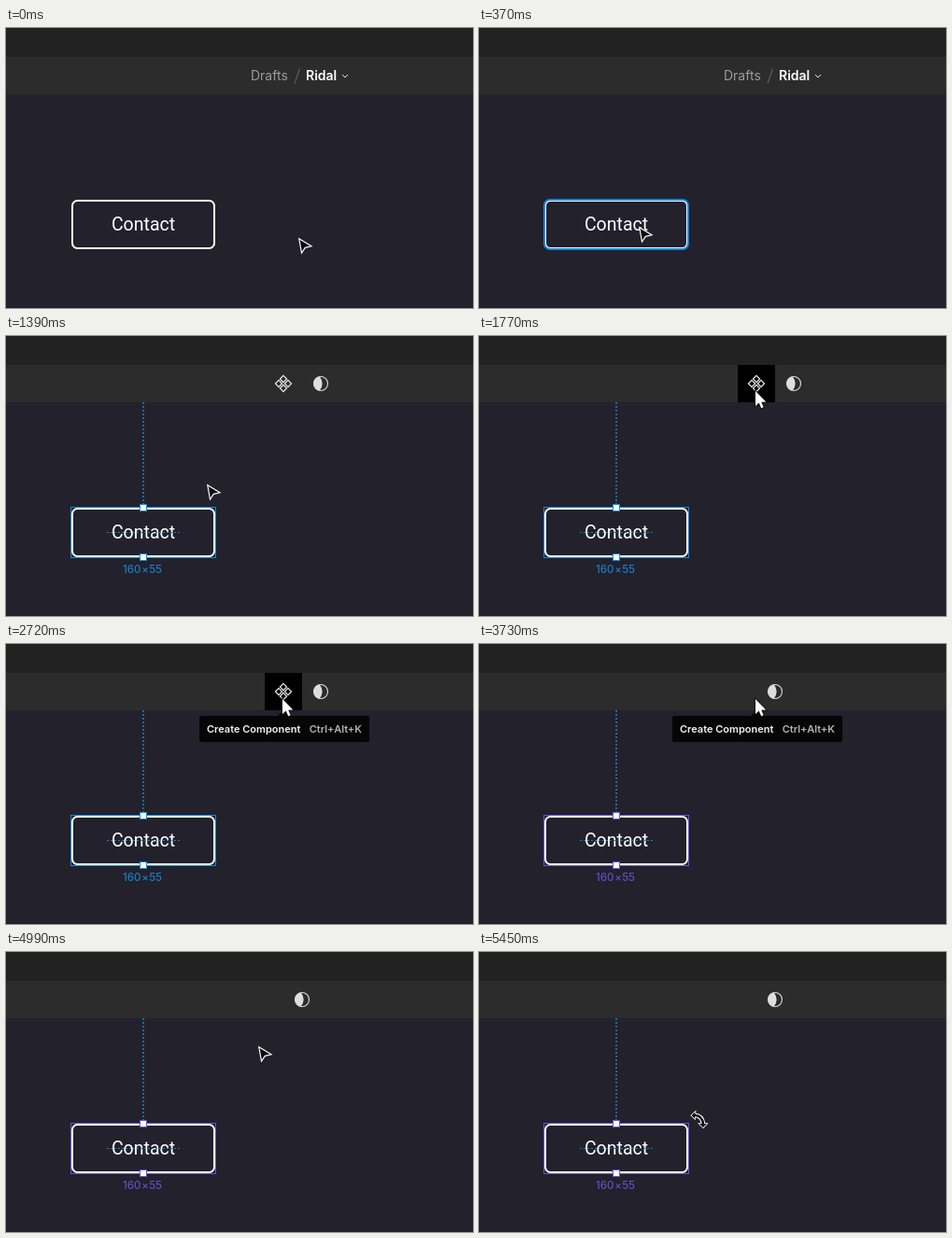
Recreate the animation shown at these times as an HTML page with a canvas. Size 500 by 300 pixels, loop 7090 ms.

```html
<!DOCTYPE html>
<html lang="en">
<head>
<meta charset="utf-8">
<title>Create component</title>
<style>
html, body { margin: 0; width: 100%; height: 100%; overflow: hidden; background: #22212c; }
canvas { display: block; width: 500px; height: 300px; }
</style>
</head>
<body>
<canvas id="stage" width="500" height="300"></canvas>
<script>
const ctx = document.getElementById('stage').getContext('2d');
const LOOP = 7090;
const BLUE = '#1588da', PURPLE = '#6a52d8';

// Pointer moves: start time, interval, step count, from, to
const moves = [
  { at: 70, gap: 75, steps: 5, from: [313, 225], to: [171, 213] },
  { at: 1230, gap: 77, steps: 8, from: [171, 213], to: [296, 59] },
  { at: 4690, gap: 75.5, steps: 10, from: [296, 59], to: [229, 170] }
];

function ease(u) {
  return 0.6 * u + 0.4 * u * u * (3 - 2 * u);
}

function pointerAt(t) {
  let pos = moves[0].from;
  for (const m of moves) {
    if (t < m.at) break;
    const step = Math.min(m.steps, Math.floor((t - m.at) / m.gap) + 1);
    const k = ease(step / m.steps);
    pos = m.from.map((v, i) => Math.round(v + (m.to[i] - v) * k));
  }
  return pos;
}

function box(x, y, w, h, color) {
  ctx.fillStyle = color;
  ctx.fillRect(x, y, w, h);
}

function text(s, x, y, font, color, align = 'left') {
  ctx.font = font;
  ctx.fillStyle = color;
  ctx.textAlign = align;
  ctx.fillText(s, x, y);
}

function line(points, color, width = 1, dash = []) {
  ctx.beginPath();
  points.forEach(([x, y]) => ctx.lineTo(x, y));
  ctx.strokeStyle = color;
  ctx.lineWidth = width;
  ctx.setLineDash(dash);
  ctx.stroke();
  ctx.setLineDash([]);
}

function shape(points, fill, stroke, width = 1, x = 0, y = 0) {
  ctx.beginPath();
  points.forEach(p => ctx.lineTo(x + p[0], y + p[1]));
  ctx.closePath();
  if (fill) {
    ctx.fillStyle = fill;
    ctx.fill();
  }
  if (stroke) {
    ctx.strokeStyle = stroke;
    ctx.lineWidth = width;
    ctx.stroke();
  }
}

function round(x, y, w, h, r) {
  ctx.beginPath();
  ctx.roundRect(x, y, w, h, r);
}

function title() {
  text('Drafts', 262, 56, '14px Inter, sans-serif', '#9c9c9c');
  line([[309, 59.5], [314.5, 43.5]], '#686868');
  text('Ridal', 321, 56, '600 14px Inter, sans-serif', '#fff');
  line([[360, 50], [363, 53], [366, 50]], '#e8e8e8');
}

function componentIcon(x, y) {
  const d = 3.6;
  for (const [dx, dy] of [[0, -5], [5, 0], [0, 5], [-5, 0]]) {
    shape([[0, -d], [d, 0], [0, d], [-d, 0]], null, '#f2f2f2', 1.1, x + dx, y + dy);
  }
}

function maskIcon(x, y) {
  ctx.beginPath();
  ctx.arc(x, y, 7.5, 0, Math.PI * 2);
  ctx.strokeStyle = '#dedede';
  ctx.lineWidth = 1.1;
  ctx.stroke();
  ctx.beginPath();
  ctx.arc(x, y, 7.5, Math.PI * 0.55, Math.PI * 1.45);
  ctx.quadraticCurveTo(x + 4.5, y, x - 1.2, y + 7.4);
  ctx.fillStyle = '#dedede';
  ctx.fill();
}

function button() {
  round(71, 185, 152, 51, 5.5);
  ctx.strokeStyle = '#fff';
  ctx.lineWidth = 2;
  ctx.stroke();
  text('Contact', 147, 216.5, '19.5px Roboto, sans-serif', '#fff', 'center');
}

function selection(color, handles) {
  ctx.strokeStyle = color;
  ctx.lineWidth = 1;
  ctx.strokeRect(69.5, 183.5, 155, 54);
  const font = '500 11.5px Inter, sans-serif';
  const ink = color === BLUE ? '#1a7cc4' : '#624dc0';
  text('160', 125, 254, font, ink);
  text('×', 149, 254, font, ink, 'center');
  text('55', 167, 254, font, ink, 'right');
  if (!handles) return;
  line([[147, 71], [147, 180]], '#2383bb', 1.5, [2, 2]);
  line([[108, 210.5], [187, 210.5]], '#1c80c4', 1, [2, 2]);
  for (const y of [184, 237]) {
    box(143, y - 4, 8, 8, color);
    box(144, y - 3, 6, 6, '#fff');
  }
}

function tooltip() {
  round(207, 77, 182, 28, 2);
  ctx.fillStyle = '#060606';
  ctx.fill();
  shape([[291, 77], [297, 71], [303, 77]], '#060606');
  const font = '600 11px Inter, sans-serif';
  text('Create Component', 215, 95, font, '#f4f4f4');
  text('Ctrl+Alt+K', 381, 95, font, '#b4b4b4', 'right');
}

function arrow(x, y) {
  const p = [[0, 0], [0, 16], [3.7, 12.6], [6.2, 18.2], [8.6, 17.2], [6.2, 11.7], [11.2, 11.4]];
  shape(p, '#fff', '#111', 1.6, x, y);
  shape(p, '#fff', null, 1, x, y);
}

function pointer(x, y) {
  shape([[0.8, 0.8], [14, 8.8], [7.3, 10.3], [3.5, 16]], '#08080c', '#fff', 1.2, x, y);
}

function rotatePointer() {
  const heads = [
    [[227.5, 175], [231.5, 171.5], [231, 178.5]],
    [[240, 188], [236, 184], [243.8, 184]]
  ];
  const arc = (color, width) => {
    ctx.beginPath();
    ctx.moveTo(231, 174.8);
    ctx.quadraticCurveTo(239, 175.5, 240, 184);
    ctx.strokeStyle = color;
    ctx.lineWidth = width;
    ctx.stroke();
  };
  heads.forEach(h => shape(h, '#fff', '#fff', 1.6));
  arc('#fff', 4.6);
  heads.forEach(h => shape(h, '#08080c'));
  arc('#08080c', 2.4);
}

function draw(t) {
  const [x, y] = pointerAt(t);
  const selected = t >= 530;
  const created = t >= 3570;

  box(0, 0, 500, 300, '#22212c');
  box(0, 0, 500, 31, '#222');
  box(0, 31, 500, 40, '#2c2c2c');

  if (!selected) {
    title();
  } else if (!created) {
    if (y < 71 && x >= 277) box(277, 31, 40, 40, '#000');
    componentIcon(297, 51);
    maskIcon(337, 51);
  } else {
    maskIcon(317, 51);
  }

  button();
  if (selected) {
    selection(t < 3650 ? BLUE : PURPLE, t >= 605);
  } else if (x < 224) {
    round(70, 184, 154, 53, 6);
    ctx.strokeStyle = BLUE;
    ctx.lineWidth = 2;
    ctx.stroke();
  }

  if (t >= 2720 && t < 4765) tooltip();

  if (t >= 5450) rotatePointer();
  else if (y < 71) arrow(x, y);
  else pointer(x, y);
}

const start = performance.now();
function tick() {
  draw((performance.now() - start) % LOOP);
  requestAnimationFrame(tick);
}
tick();
</script>
</body>
</html>
```
